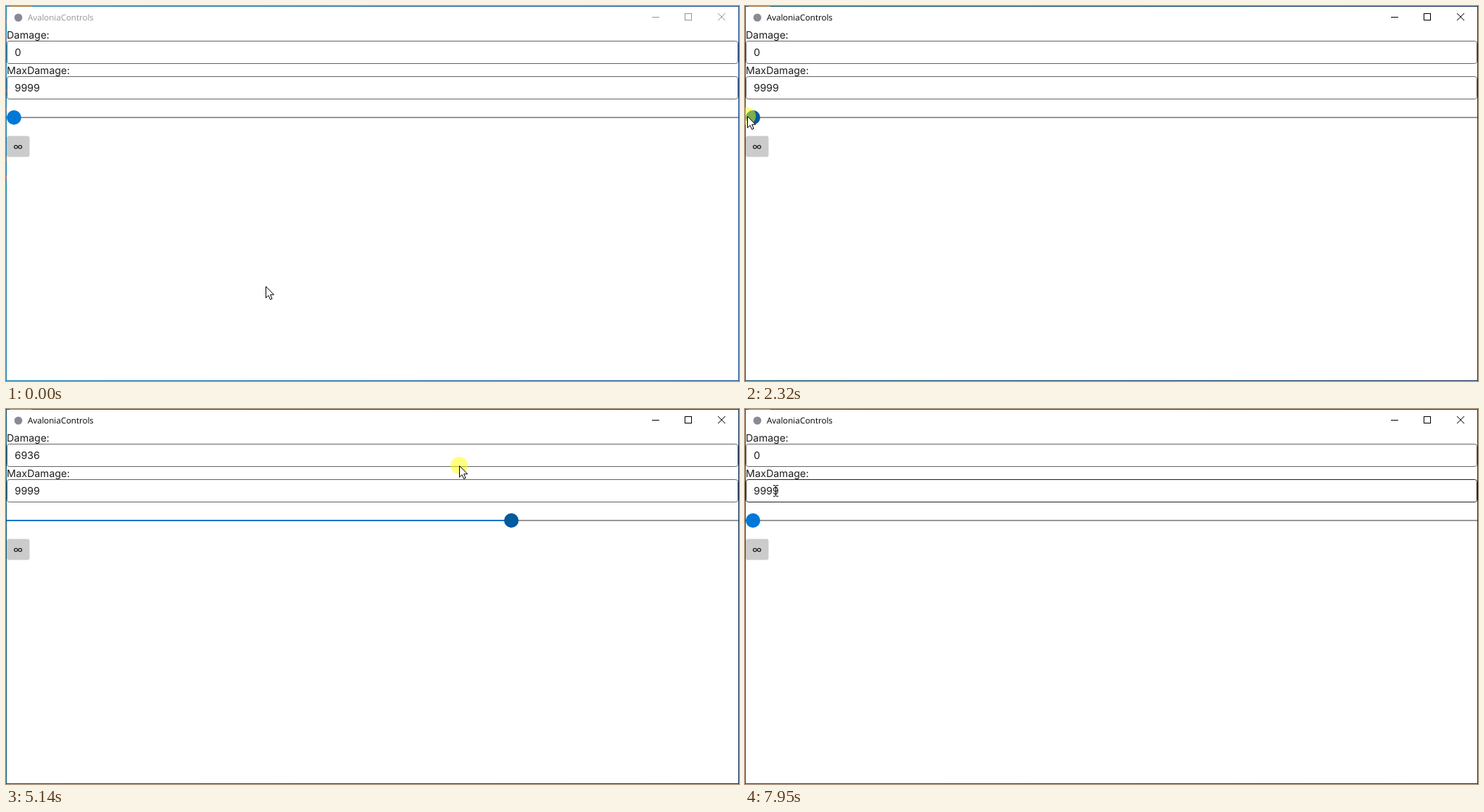
Animation of 1011 by 518 pixels, one loop 8 s. Source, as an HTML page:

```html
<!DOCTYPE html>
<html lang="en">
<head>
<meta charset="utf-8">
<title>Slider</title>
<style>
  html, body { margin: 0; width: 100%; height: 100%; overflow: hidden; background: #fff; }
  svg { display: block; width: 1011px; height: 518px; }
  text { font: 14px Inter, sans-serif; fill: #1c1c1c; text-rendering: geometricPrecision; }
  .title { font: 11.5px "Open Sans", "Noto Sans", sans-serif; fill: var(--chrome); }
  .chrome { fill: none; stroke: var(--chrome); }
  .crisp { shape-rendering: crispEdges; }
  .box { fill: #fff; stroke: #666; }
  #stage { --chrome: #969696; --left: #1a80aa; --right: #1d4e8f; }
  #stage.active { --chrome: #000; --left: #105470; --right: #12315c; }
  #stage.active .idle-only { display: none; }
</style>
</head>
<body>
<svg id="stage" viewBox="0 0 1011 518">
  <defs>
    <linearGradient id="edge">
      <stop offset="0" style="stop-color:var(--left)"/>
      <stop offset="1" style="stop-color:var(--right)"/>
    </linearGradient>
  </defs>
  <rect class="crisp" x=".5" y=".5" width="1010" height="517" fill="#fff" stroke="url(#edge)"/>
  <path class="crisp idle-only" d="M.5 20V240" stroke="#c06a6a" stroke-dasharray="4 21 4 66"/>
  <path class="crisp" d="M5 .5H35" stroke="#a9763f"/>

  <circle cx="17" cy="16" r="5.5" fill="#8b8994"/>
  <text class="title" x="30" y="20">AvaloniaControls</text>
  <path class="chrome crisp" d="M891 15.5H901M936.5 10.5h9v9h-9z"/>
  <path class="chrome" d="M982 10L992 20M992 10L982 20"/>

  <text x="1" y="45">Damage:</text>
  <rect class="box" x="1.5" y="48.5" width="1008" height="31" rx="3"/>
  <text id="damage" x="12" y="69">0</text>
  <text x="1" y="94">MaxDamage:</text>
  <rect id="maxBox" class="box" x="1.5" y="97.5" width="1008" height="31" rx="3"/>
  <text x="12" y="118">9999</text>

  <rect id="track" x="1" y="153" width="1009" height="2"/>
  <rect id="fill" x="1" y="153" height="2" fill="#0476cc"/>
  <circle id="thumb" cy="154" r="10"/>
  <rect x="1" y="179.5" width="31.5" height="29" rx="3" fill="#cbcbcb"/>
  <text x="16.5" y="199" text-anchor="middle">∞</text>

  <g id="pointer">
    <circle id="halo" r="12" fill="#ff0" fill-opacity=".5"/>
    <path id="arrow" d="M.5 .5V16.2L4 12.8L6.5 18.5L9 17.4L6.6 11.8H11.5Z" fill="#fff" stroke="#000"/>
    <path id="beam" class="crisp" d="M-3 -7.5H0M1 -7.5H4M.5 -7V7M-3 7.5H0M1 7.5H4" fill="none" stroke="#000"/>
  </g>
</svg>
<script>
  const LOOP = 8000, FIRST = 500, TICK = 201.3;   // ms; the screen updates once per tick
  const LOW = 11, HIGH = 1000, MAX = 9999;        // thumb range and its top value
  const LAG = 0.3344, GRAB = 7.64;                // thumb trails the pointer: ticks, px
  const HOVER = 5, PRESS = 8, RELEASE = 34;       // in ticks

  // Turning points of the pointer: tick, x, y
  const path = [
    [-1, 358, 387], [5, 18, 150], [6, 18, 150], [7, 3.36, 152],  // reach the thumb
    [10, 3.36, 152], [13, 592, 81], [18, 1050, 23],              // drag right
    [21, 1010, 60], [23, 625, 78], [30, -60, 125],               // drag left
    [33, 4, 94], [37, 42, 113]                                   // back to the field
  ];

  const el = id => document.getElementById(id);
  const show = (id, on) => { el(id).style.display = on ? "" : "none"; };
  const clamp = (v, low, high) => Math.min(Math.max(v, low), high);

  function pointerAt(tick) {
    const next = clamp(path.findIndex(point => point[0] > tick), 1, path.length - 1);
    const [t0, x0, y0] = path[next - 1], [t1, x1, y1] = path[next];
    const u = clamp((tick - t0) / (t1 - t0), 0, 1);
    return [x0 + (x1 - x0) * u, y0 + (y1 - y0) * u];
  }

  function draw(time) {
    const tick = Math.max(-1, Math.floor((time - FIRST) / TICK));
    const pressed = tick >= PRESS && tick < RELEASE;
    const hover = tick >= HOVER && tick < PRESS;
    const editing = tick >= RELEASE;
    const [x, y] = tick >= path.at(-1)[0] ? path.at(-1).slice(1) : pointerAt(tick);
    const thumb = pressed ? clamp(pointerAt(tick - LAG)[0] + GRAB, LOW, HIGH) : LOW;

    el("stage").classList.toggle("active", tick >= PRESS);
    el("damage").textContent = Math.round((thumb - LOW) / (HIGH - LOW) * MAX);
    el("thumb").setAttribute("cx", thumb);
    el("thumb").setAttribute("fill", pressed ? "#005a9e" : hover ? "#2899fa" : "#0078d7");
    el("fill").setAttribute("width", thumb - 1);
    el("track").setAttribute("fill", hover ? "#666" : "#999");
    el("maxBox").style.stroke = editing ? "#222" : "";

    show("halo", pressed);
    show("arrow", !editing);
    show("beam", editing);
    el("pointer").setAttribute("transform", `translate(${Math.round(x)} ${Math.round(y)})`);
  }

  const start = performance.now();
  function frame() {
    draw((performance.now() - start) % LOOP);
    requestAnimationFrame(frame);
  }
  frame();
</script>
</body>
</html>
```
